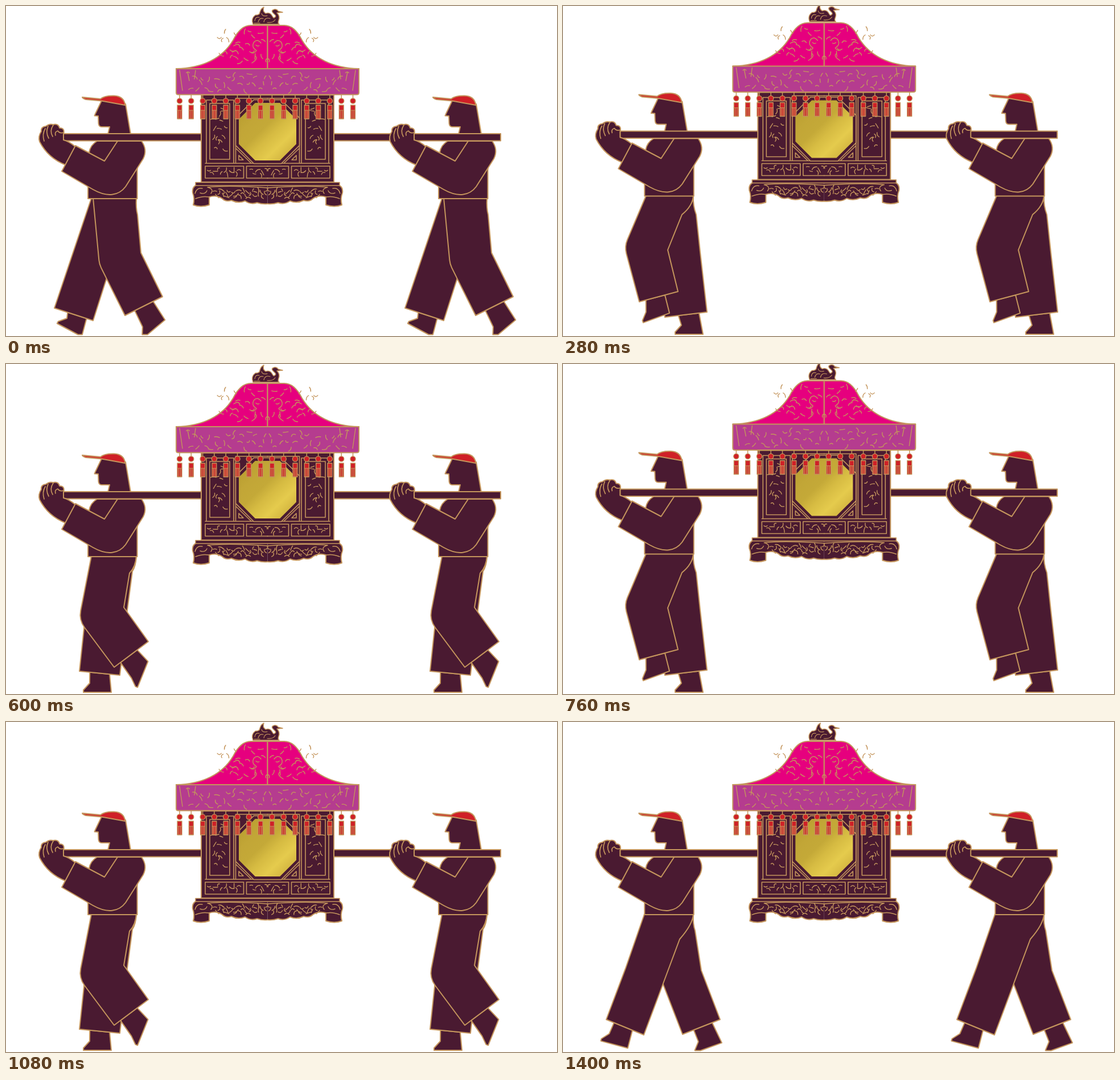
An HTML page with a canvas for the animation above (1.44 s loop, 968 by 579 pixels).

```html
<!DOCTYPE html>
<html lang="en">
<head>
<meta charset="utf-8">
<title>Sedan chair</title>
<style>
html, body { margin: 0; width: 100%; height: 100%; overflow: hidden; background: #fff; }
canvas { display: block; }
</style>
</head>
<body>
<canvas id="stage" width="968" height="579"></canvas>
<script>
const ctx = document.getElementById('stage').getContext('2d');
const DARK = '#4a1a31', GOLD = '#c4955c', PINK = '#e6007e', PURPLE = '#b53c8f', RED = '#cf2027';
const STEP = 480, FRAME = 40, GAP = 616, MIRROR = 919, GROUND = 576.5;

// Stride of one leg: a full cycle takes two steps.
// hip x | crotch | front knee | front cuff | back cuff | back knee | foot x, y, angle
const TIMES = [0, 120, 280, 440, 480, 600, 760, 920];
const STRIDE = [
  [153, 231, 366, 164, 453, 209, 543, 275, 510, 237, 433, 242, 539, -40],
  [150, 217, 367, 128, 449, 190, 532, 250, 487, 207, 427, 211, 529, -68],
  [146, 209, 366, 108, 422, 134, 519, 202, 501, 184, 428, 156, 515, -20],
  [143, 205, 381, 110, 432, 76, 522, 142, 549, 174, 464, 102, 535, 15],
  [150, 205, 390, 118, 432, 85, 530, 153, 552, 176, 480, 130, 541, 28],
  [150, 222, 364, 139, 445, 129, 539, 200, 546, 213, 432, 164, 543, 0],
  [150, 234, 366, 165, 440, 179, 546, 253, 537, 241, 432, 225, 543, 0],
  [150, 232, 366, 165, 432, 210, 548, 276, 522, 243, 436, 248, 539, -20]
];
const FOOT = [[-17, 17], [-28, 29], [-28, 33], [21, 33]];

function legPose(t) {
  const n = TIMES.length, cycle = 2 * STEP;
  const at = i => TIMES[(i + n) % n] + Math.floor(i / n) * cycle;
  const val = (i, k) => STRIDE[(i + n) % n][k];
  let i = n - 1;
  while (TIMES[i] > t) i--;
  const span = at(i + 1) - at(i), u = (t - at(i)) / span;
  const slope = (j, k) => (val(j + 1, k) - val(j - 1, k)) / (at(j + 1) - at(j - 1)) * span;
  return STRIDE[0].map((_, k) => {
    const a = val(i, k), b = val(i + 1, k), m = slope(i, k), q = slope(i + 1, k);
    return a + u * (m + u * (3 * (b - a) - 2 * m - q + u * (2 * (a - b) + m + q)));
  });
}

function paint(path, fill, line = GOLD, width = 2) {
  if (fill) { ctx.fillStyle = fill; ctx.fill(path); }
  if (line) { ctx.strokeStyle = line; ctx.lineWidth = width; ctx.stroke(path); }
}
const shape = d => new Path2D(d);

function polygon(points) {
  const p = new Path2D();
  points.forEach(([x, y]) => p.lineTo(x, y));
  p.closePath();
  return p;
}

function cutAtGround(points) {
  const out = [];
  points.forEach((a, i) => {
    const b = points[(i + 1) % points.length];
    if (a[1] <= GROUND) out.push(a);
    if ((a[1] <= GROUND) !== (b[1] <= GROUND)) {
      const u = (GROUND - a[1]) / (b[1] - a[1]);
      out.push([a[0] + u * (b[0] - a[0]), GROUND]);
    }
  });
  return out;
}

function drawLeg(t, dy) {
  const [hip, cx, cy, kx, ky, fx, fy, bx, by, nx, ny, ax, ay, deg] = legPose(t);
  const c = Math.cos(deg * Math.PI / 180), s = Math.sin(deg * Math.PI / 180);
  // The ankle leaves the cuff near its middle, pulled towards the foot.
  const mid = .25 + .5 * (ax - fx) / (bx - fx);
  const onCuff = u => [fx + u * (bx - fx), fy + u * (by - fy)];
  const sole = FOOT.map(([x, y]) => [ax + x * c - y * s, ay + x * s + y * c]);
  paint(polygon(cutAtGround([onCuff(mid - .24), ...sole, onCuff(mid + .25)])), DARK);

  const p = new Path2D();
  p.moveTo(hip, 337 + dy);
  p.arcTo(kx, ky, fx, fy, 38);
  p.lineTo(fx, fy);
  p.lineTo(bx, by);
  p.lineTo(nx, ny);
  p.lineTo(cx, cy);
  p.quadraticCurveTo(228, 355 + dy, 229, 337 + dy);
  p.closePath();
  paint(p, DARK);
}

// Carving: short seeded curls inside a box.
function curls(x, y, w, h, n, seed) {
  const rnd = () => (seed = (seed * 16807) % 2147483647) / 2147483647;
  const p = new Path2D();
  for (let i = 0; i < n; i++) {
    const a = rnd() * 7, len = 2.5 + rnd() * 2.5, bend = (rnd() - .5) * 9;
    const px = x + (i + rnd()) * w / n, py = y + ((i * .618 + rnd() * .25) % 1) * h;
    const c = Math.cos(a) * len, s = Math.sin(a) * len;
    p.moveTo(px - c, py - s);
    p.quadraticCurveTo(px - s / len * bend, py + c / len * bend, px + c, py + s);
  }
  return p;
}

function both(draw) {
  draw();
  ctx.save();
  ctx.translate(MIRROR, 0);
  ctx.scale(-1, 1);
  draw();
  ctx.restore();
}

const torso = shape('M144 338V317L146 257Q148 244 160 237H237L230.500 287V338Z');
const head = shape('M168 166L156.500 190L155.500 192.500L162 193L162.500 206Q163 212 168 212H182L179 225H219L210 172Z');
const cap = shape('M134 160L166 163Q173 157 190 157.500Q207 158 209.500 174L168 166.500L140 164Q134 162 134 160Z');
const hand = shape('M122 247Q110 237 101 235V225Q104 214 94 214Q92 206 83 208Q76 206 70 211Q61 212 62 220Q56 229 59 238Q74 267 105 279Z');
const fingers = shape('M67 237Q63 225 69 215M75 232Q69 221 74 211M82 229Q76 219 83 209M101 222Q94 224 91 219Q85 221 87 227');
const sleeve = shape('M196 237L173 272L122 245L98 290L153 322C178 336 198 333 210 317L241 268Q249 252 238 237Z');
const pole = shape('M101 224H869V236.500H101Z');

const roof = shape('M299 110C345 109 380 92 399 60Q412 34 430 34H459.500V110');
const valance = shape('M299 110H620V152Q620 155.500 616 155.500H303Q299 155.500 299 152Z');
const valanceTrim = shape('M305 113L310 148M333 113L331 128M319 116L322 131');
const roofCarving = curls(372, 42, 86, 62, 25, 41);
const headCarving = shape('M432 100Q444 92 438 88M428 80Q435 86 440 78Q430 72 436 63Q442 57 448 65M398 81Q406 75 408 84M400 70Q408 64 411 71');
const valanceCarving = curls(318, 117, 140, 33, 27, 77);

const cabin = shape('M343 156H576V309H343Z');
const frame = shape('M352 276V165H400V276M358 171H393V269H358ZM403.500 162V276M350 276H460M350 281H417.500V302H350ZM460 281H422.500V302H460M404 162H460M404 250L431 276M409 262V270H417L409 262');
const panelCarving = curls(363, 178, 24, 84, 16, 15);
const rowCarving = curls(356, 286, 56, 11, 11, 9);
const midCarving = curls(428, 286, 31, 11, 6, 23);

const base = shape('M459.500 312H342Q326 314 328 328Q332 338 329 349Q342 354 357 349V335Q370 331 380 338Q386 344 396 341Q408 347 420 342Q430 349 441 345Q450 348 459.500 347');
const baseTrim = shape('M459 319Q390 314 354 318Q366 321 360 329M332 329Q335 318 345 320M353 324Q350 331 341 328M333 338Q345 333 356 335');
const baseCarving = curls(366, 322, 93, 16, 30, 101);
const plate = shape('M333 309.500H586V315H333Z');

const swan = shape('M434 32Q430 22 438 16Q446 16 446 11Q448 4 453 2Q450 9 456 13Q464 10 468 18Q470 22 472 20Q476 18 471 14Q464 8 471 6Q476 5 478 9L486 11L476 12Q482 18 479 25Q477 30 480 32Z');
const feathers = shape('M437 26Q438 18 445 20M443 28Q445 20 452 22M449 13Q450 19 459 17M453 28Q455 19 464 22M459 29Q469 30 473 24M436 30H446');

function octagon(r) {
  const k = r * .43, x = 459.5, y = 220.5;
  return polygon([[-k, -r], [k, -r], [r, -k], [r, k], [k, r], [-k, r], [-r, k], [-r, -k]].map(([a, b]) => [x + a, y + b]));
}
const window8 = octagon(50.5), rim = octagon(56);

const foil = ctx.createLinearGradient(415, 175, 505, 268);
[[0, '#b89d2f'], [.25, '#c2a637'], [.42, '#c4a938'], [.56, '#d6bb42'], [.74, '#e5cb4d'], [1, '#cbab3a']]
  .forEach(([at, color]) => foil.addColorStop(at, color));

function drawTassel(x) {
  paint(shape(`M${x} 156V162`), null, GOLD, 1.5);
  const ball = new Path2D();
  ball.arc(x, 166.5, 4.6, 0, 7);
  paint(ball, RED, GOLD, 1.3);
  const skirt = new Path2D();
  skirt.rect(x - 4, 174, 8, 24);
  paint(skirt, RED, GOLD, 1.3);
  paint(shape(`M${x - 4} 183H${x + 4}M${x - 1.5} 183V198M${x + 1.5} 183V198`), null, GOLD, 1.2);
}

function drawSedan() {
  paint(cabin, DARK);
  both(() => {
    paint(frame, null, GOLD, 1.6);
    [panelCarving, rowCarving, midCarving].forEach(p => paint(p, null, GOLD, 1.4));
  });
  paint(rim, DARK, GOLD, 1.6);
  paint(window8, foil, null);
  both(() => {
    paint(base, DARK);
    paint(baseTrim, null, GOLD, 1.4);
    paint(baseCarving, null, GOLD, 1.4);
  });
  paint(plate, DARK, GOLD, 1.6);
  for (let i = 0; i < 16; i++) drawTassel(305 + i * 20.3);
  paint(swan, DARK, GOLD, 1.5);
  paint(feathers, null, GOLD, 1.2);
  both(() => {
    paint(roof, PINK);
    paint(roofCarving, null, GOLD, 1.4);
    paint(headCarving, null, GOLD, 1.4);
  });
  paint(valance, PURPLE);
  both(() => {
    paint(valanceTrim, null, GOLD, 1.4);
    paint(valanceCarving, null, GOLD, 1.4);
  });
}

function shifted(x, y, draw) {
  ctx.save();
  ctx.translate(x, y);
  draw();
  ctx.restore();
}

function render(ms) {
  const t = Math.floor(ms / FRAME) * FRAME % STEP;
  const lift = Math.max(0, Math.min(1, (t - 120) / 320));
  const dy = -4.5 * Math.sin(lift * Math.PI) ** 2;
  const dx = t < 200 ? 0 : -.7;
  ctx.fillStyle = '#fff';
  ctx.fillRect(0, 0, 968, 579);
  ctx.lineJoin = 'round';
  ctx.lineCap = 'round';

  for (const x of [0, GAP]) {
    shifted(x, 0, () => {
      drawLeg(t + STEP, dy);
      drawLeg(t, dy);
    });
    shifted(x + dx, dy, () => {
      paint(torso, DARK);
      paint(head, DARK);
      paint(cap, RED);
    });
  }
  shifted(dx, dy, () => {
    paint(pole, DARK);
    for (const x of [0, GAP]) {
      shifted(x, 0, () => {
        paint(hand, DARK);
        paint(fingers, null, GOLD, 1.7);
        paint(sleeve, DARK);
      });
    }
    drawSedan();
  });
}

const start = performance.now();
function tick() {
  render(performance.now() - start);
  requestAnimationFrame(tick);
}
tick();
</script>
</body>
</html>
```
